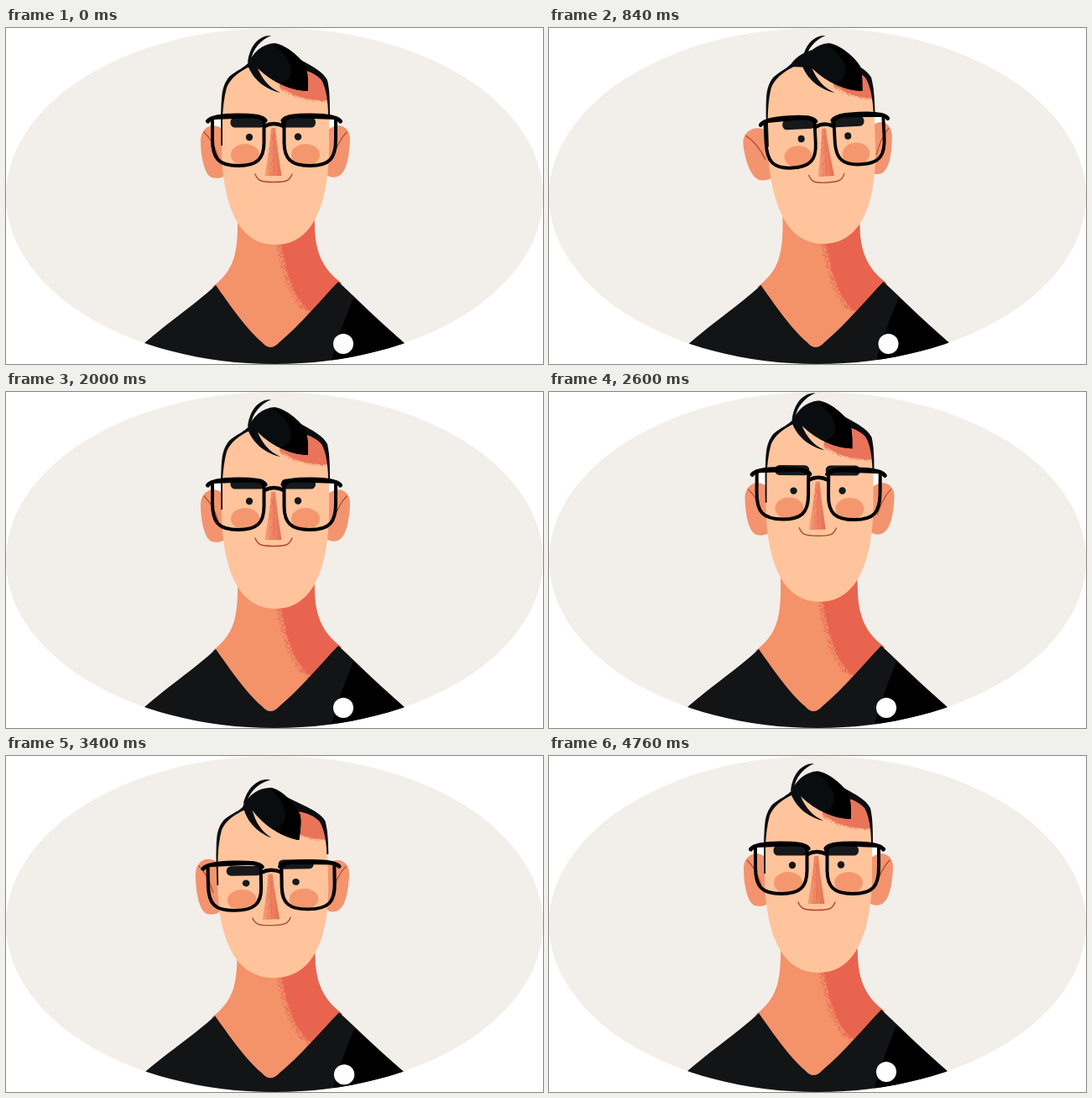
Recreate the animation shown at these times as an HTML page with a canvas. Size 640x400 px, loop 4.8 s.

```html
<!DOCTYPE html>
<html lang="en">
<head>
<meta charset="utf-8">
<title>Portrait</title>
<style>
html, body { margin: 0; width: 100%; height: 100%; overflow: hidden; background: #fff; }
canvas { display: block; width: 640px; height: 400px; }
</style>
</head>
<body>
<canvas id="stage" width="640" height="400"></canvas>
<script>
const ctx = document.getElementById('stage').getContext('2d');
const LOOP = 4800;
const C = {
  back: '#f2eeea', skin: '#ffc49c', neck: '#f4926a', ear: '#f3946f', cheek: '#f4976f',
  shade: '#e8644f', line: '#b2492f', shirt: '#121416', hair: '#0a0d10', brow: '#15191c', black: '#000'
};

const P = d => new Path2D(d);
const shape = {
  neck: P('M276 215 L276 240 C275 268 272 289 246 308 L315 400 L400 304 C376 286 369 265 368 240 L367 215 Z'),
  neckShade: P('M319 225 C332 255 332 320 368 340 L400 304 L390 215 Z'),
  shirt: P('M250 306 C225 330 190 352 155 384 L155 412 L485 412 L485 384 C450 354 425 329 396 302 C375 324 350 354 326 374 Q315 386 305 374 C288 360 266 329 250 306 Z'),
  sleeve: P('M414 321 C405 345 394 368 384 412 L485 412 L485 384 C455 358 432 338 414 321 Z'),
  earL: P('M262 124 C250 110 232 116 232 134 C232 152 236 174 245 178 C252 180 260 178 262 174 Z'),
  earR: P('M381 124 C394 110 411 116 410 134 C409 152 406 173 395 177 C390 179 384 177 381 174 Z'),
  foldL: P('M236 124 Q247 134 253 154'),
  foldR: P('M406 124 Q396 134 390 154'),
  face: P('M257 75 Q262 55 300 44 L355 44 Q381 55 385 75 L385 140 C385 200 370 258 321 258 C272 258 257 200 257 140 Z'),
  foreheadShade: P('M326 69 C340 79 352 84 372 86 L400 87 L400 40 L330 40 Z'),
  cap: P('M256 106 C257 85 256 70 266 58 C275 50 284 48 291 39 C300 30 315 24 330 26 L355 40 C364 45 378 52 383 62 C386 75 386 90 386 104 L384 104 C384 90 382 72 376 62 C370 55 362 52 355 50 L291 46 C279 51 267 60 263 71 C260 82 258.6 95 258 106 L258 140 L256.3 140 Z'),
  quiff: P('M288 44 C294 29 305 19 320 18 C334 20 350 34 357 45 C360 53 360 64 360 75 C342 75 318 66 300 48 C306 62 314 71 327 77 C309 73 294 61 288 44 Z'),
  quiffShade: P('M318 20 C334 21 350 34 357 45 C360 53 360 64 360 75 C348 75 336 71 326 66 C350 60 340 34 318 20 Z'),
  strand: P('M316 9 C303 8 290 20 288 42 L292 38 C294 26 303 14 316 9 Z'),
  nose: P('M316 119 L321 119 C323 140 326 160 328.5 176 L308.5 176 C311 160 314.5 140 316 119 Z'),
  mouth: P('M297 174 C300 182 304 183.5 319 183.5 C334 183.5 338 182 341 174'),
  lensL: P('M246 107 L246 132 C246 155 253 164 277 164 C299 164 307.5 156 307.5 136 L307.5 110 L300 105 Z'),
  lensR: P('M331.5 110 L331.5 136 C331.5 156 340 164 362 164 C386 164 393 155 393 132 L393 107 L339 105 Z'),
  frameTop: P('M240.5 111 C244 106 257 104 276 104 C294 104 306 105 309 110 M330 110 C333 105 345 104 363 104 C382 104 395 106 398.5 111'),
  bridge: P('M308 117 Q319 111 331 117')
};

// Each pose lists dx, dy, degrees, added x scale, added y scale.
const parts = {
  face:   { pivot: [321, 258], turn: [8, -1, -2, 0, 0],      up: [1.5, -8, 0, 0, 0],   down: [-.5, 6, -1.2, .03, -.052] },
  feat:   { pivot: [319, 140], turn: [10, .5, -3, -.04, 0],  up: [1.5, -12, .4, 0, 0], down: [-3, 20, -1, .025, -.05] },
  earL:   { pivot: [247, 147], turn: [3, 3, -6, .15, 0],     up: [1.5, -8, 0, 0, 0],   down: [-6, 8, 0, 0, .05] },
  earR:   { pivot: [396, 147], turn: [0, -4, -2, -.05, 0],   up: [1.5, -8, 0, 0, 0],   down: [-1, 7.5, 0, 0, 0] },
  quiff:  { pivot: [325, 45],  turn: [13.5, 0, 0, 0, 0],     up: [1.5, -7.5, 0, 0, 0], down: [-6, 20, 8, 0, 0] },
  shadow: { pivot: [350, 70],  turn: [13, -2, 0, 0, 0],      up: [1.5, -6, 0, 0, 0],   down: [5, 13, 0, 0, 0] }
};

const tracks = {
  turn:  [[160, 0], [620, 1], [1520, 1], [1960, 0]],
  up:    [[1480, 0], [1700, .4], [1960, 0], [2200, 0], [2640, 1.04], [2800, 1.04], [3020, 0]],
  down:  [[2840, 0], [3180, 1.2], [4080, 0]],
  dip:   [[2840, 0], [3160, 4], [4080, 0]],
  raise: [[1700, 0], [1960, 3], [2200, 3], [2600, 7], [2840, 7], [3100, 0]]
};

function sample(keys, t) {
  const next = keys.findIndex(k => k[0] > t);
  if (next === 0) return keys[0][1];
  if (next < 0) return keys[keys.length - 1][1];
  const [t0, a] = keys[next - 1], [t1, b] = keys[next];
  const u = (t - t0) / (t1 - t0);
  return a + (b - a) * u * u * (3 - 2 * u);
}

function fill(path, color) { ctx.fillStyle = color; ctx.fill(path); }

function stroke(path, color, width) {
  ctx.strokeStyle = color;
  ctx.lineWidth = width;
  ctx.lineCap = ctx.lineJoin = 'round';
  ctx.stroke(path);
}

function oval(x, y, rx, ry, color) {
  ctx.fillStyle = color;
  ctx.beginPath();
  ctx.ellipse(x, y, rx, ry, 0, 0, Math.PI * 2);
  ctx.fill();
}

function group(draw) { ctx.save(); draw(); ctx.restore(); }

function seeded(seed) {
  return () => (seed = (seed * 16807) % 2147483647) / 2147483647;
}

// Scatters specks beside a cubic curve, thinning out along the normal.
function grain(a, b, c, d, count, spread, seed) {
  const rnd = seeded(seed), path = new Path2D();
  const at = (u, i) => (1 - u) ** 3 * a[i] + 3 * u * (1 - u) ** 2 * b[i] + 3 * u * u * (1 - u) * c[i] + u ** 3 * d[i];
  for (let i = 0; i < count; i++) {
    const u = rnd(), off = spread * rnd() ** 2;
    const dx = at(u + .01, 0) - at(u, 0), dy = at(u + .01, 1) - at(u, 1), len = Math.hypot(dx, dy);
    path.rect(at(u, 0) - dy / len * off, at(u, 1) + dx / len * off, 1, 1);
  }
  return path;
}

const neckGrain = grain([319, 225], [332, 255], [332, 320], [368, 340], 520, 7, 11);
const foreheadGrain = grain([326, 69], [340, 79], [352, 84], [400, 87], 150, 3, 23);
const noseGrain = grain([319, 122], [320, 140], [319, 160], [319, 176], 110, 6, 37);

const noseFill = ctx.createLinearGradient(309, 0, 328, 0);
noseFill.addColorStop(0, '#f49b73');
noseFill.addColorStop(.4, '#f08c68');
noseFill.addColorStop(1, '#e66d52');

function place(name, pose) {
  const { pivot: [px, py], ...poses } = parts[name];
  const [dx, dy, deg, sx, sy] = poses.turn.map((v, i) =>
    v * pose.turn + poses.up[i] * pose.up + poses.down[i] * pose.down);
  ctx.translate(px + dx, py + dy);
  ctx.rotate(deg * Math.PI / 180);
  ctx.scale(1 + sx, 1 + sy);
  ctx.translate(-px, -py);
}

function part(name, pose, draw) {
  group(() => { place(name, pose); draw(); });
}

function drawBody(pose) {
  group(() => {
    // Shoulders widen slightly as the body sinks.
    ctx.translate(320 + 2.5 * pose.turn, pose.dip);
    ctx.scale(1 + .004 * pose.dip, 1);
    ctx.translate(-320, 0);
    fill(shape.neck, C.neck);
    group(() => {
      ctx.clip(shape.neck);
      fill(shape.neckShade, C.shade);
      fill(neckGrain, C.shade);
    });
    fill(shape.shirt, C.shirt);
    fill(shape.sleeve, C.black);
    oval(402, 376, 12, 12, '#fff');
  });
}

function drawEar(name, fold, pose) {
  part(name, pose, () => {
    fill(shape[name], C.ear);
    stroke(fold, C.line, 1.2);
  });
}

function drawBrow(x, y) {
  ctx.fillStyle = C.brow;
  ctx.beginPath();
  ctx.roundRect(x - 20.5, y - 6, 41, 12, 5.5);
  ctx.fill();
}

function drawFeatures(pose) {
  oval(285, 151, 17, 13, C.cheek);
  oval(357, 151, 17, 13, C.cheek);
  fill(shape.nose, noseFill);
  group(() => { ctx.clip(shape.nose); fill(noseGrain, '#e66d52'); });
  stroke(shape.mouth, C.line, 1.4);
  oval(290, 130, 4.2, 4.2, C.brow);
  oval(348, 129.5, 4.2, 4.2, C.brow);
  drawBrow(288, 112.5 - pose.raise + 2 * pose.down);
  drawBrow(348.5, 112.5 - pose.raise - 5 * pose.down);
  stroke(shape.lensL, C.black, 4);
  stroke(shape.lensR, C.black, 4);
  stroke(shape.frameTop, C.black, 5);
  stroke(shape.bridge, C.black, 4.6);
}

function drawHead(pose) {
  part('feat', pose, () => { fill(shape.lensL, '#fff'); fill(shape.lensR, '#fff'); });
  drawEar('earL', shape.foldL, pose);
  drawEar('earR', shape.foldR, pose);
  part('face', pose, () => fill(shape.face, C.skin));
  group(() => {
    const keep = ctx.getTransform();
    place('face', pose);
    ctx.clip(shape.face);
    ctx.setTransform(keep);
    place('shadow', pose);
    fill(shape.foreheadShade, '#e9745a');
    fill(foreheadGrain, '#e9745a');
  });
  part('face', pose, () => fill(shape.cap, C.hair));
  part('feat', pose, () => drawFeatures(pose));
  part('quiff', pose, () => {
    fill(shape.strand, C.hair);
    fill(shape.quiff, C.hair);
    fill(shape.quiffShade, C.black);
  });
}

function render(now) {
  const t = now % LOOP, pose = {};
  for (const key in tracks) pose[key] = sample(tracks[key], t);
  ctx.fillStyle = '#fff';
  ctx.fillRect(0, 0, 640, 400);
  group(() => {
    ctx.beginPath();
    ctx.ellipse(320, 200, 320, 200, 0, 0, Math.PI * 2);
    ctx.clip();
    ctx.fillStyle = C.back;
    ctx.fillRect(0, 0, 640, 400);
    drawBody(pose);
    drawHead(pose);
  });
}

const start = performance.now();
function tick() {
  render(performance.now() - start);
  requestAnimationFrame(tick);
}
tick();
</script>
</body>
</html>
```
